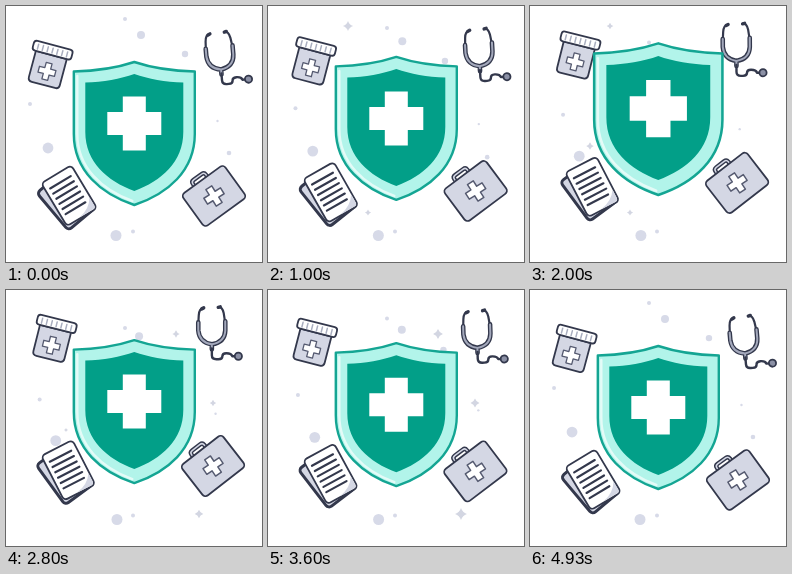
An HTML page that plays this animation: 256 by 256 pixels, repeating every 4990 ms.

```html
<!DOCTYPE html>
<html lang="en">
<head>
<meta charset="utf-8">
<title>Medical shield</title>
<style>
html, body { margin: 0; width: 100%; height: 100%; overflow: hidden; background: #fff; }
svg { display: block; width: 100vw; height: 100vh; }
.ink { stroke: #33384c; stroke-width: 1.8; stroke-linejoin: round; stroke-linecap: round; }
.grey { fill: #d4d7e4; }
.white { fill: #fff; }
.none { fill: none; }
</style>
</head>
<body>
<svg viewBox="0 0 256 256" xmlns="http://www.w3.org/2000/svg">
  <defs>
    <path id="plus" d="M-3 -8.500H3V-3H8.500V3H3V8.500H-3V3H-8.500V-3H-3Z"/>
    <path id="spark" d="M0 -1Q.25 -.25 1 0Q.25 .25 0 1Q-.25 .25 -1 0Q-.25 -.25 0 -1Z"/>
  </defs>

  <g id="dots" fill="#d7dae8"></g>
  <g id="sparks" fill="#d3d6e2"></g>

  <g id="bottle" class="ink">
    <path class="grey" d="M-16 -13H16V14Q16 18 12 18H-12Q-16 18 -16 14Z"/>
    <rect class="white" x="-20" y="-23" width="40" height="10" rx="3"/>
    <path stroke="#a9aebf" stroke-width="1.5" d="M-15 -20V-15M-10 -20V-15M-5 -20V-15M0 -20V-15M5 -20V-15M10 -20V-15M15 -20V-15"/>
    <use href="#plus" class="white" transform="translate(0 4)" stroke-width="1.3" stroke="#555a70"/>
  </g>

  <g id="scope" class="ink none">
    <path stroke-width="2.200" d="M197 18Q193 18 192.500 25L192 34M219 33L217.500 23Q216 16 212 17"/>
    <path id="tube" stroke-width="4.600" d="M192 32V40Q193 52 205.500 54Q218.500 52 219 40V31M205.500 54V59"/>
    <path stroke="#a3a8bb" stroke-width="2" d="M192 32V40Q193 52 205.500 54Q218.500 52 219 40V31M205.500 54V59"/>
    <path stroke-width="2.400" d="M205.500 58V65Q205.500 69 210 69H212Q216 69 216 66Q216 63 220 63Q225 63 226 66H229"/>
    <path stroke-width="3.400" d="M195.500 18.500L197.500 17.500M214 16.500L212 17"/>
    <circle cx="232" cy="66" r="3.600" fill="#8b90a5"/>
  </g>

  <g id="papers" class="ink">
    <rect class="grey" x="-17" y="-25" width="34" height="49" rx="4" transform="translate(-3 3) rotate(-9)" stroke-width="3"/>
    <rect class="white" x="-17" y="-25" width="35" height="50" rx="4" transform="translate(2 0)"/>
    <path fill="#d4d7e4" stroke="none" d="M19 12V21Q19 24 16 24H0Q13 22 19 12Z"/>
    <path stroke-width="2.200" d="M-10 -16H14M-10 -10H14M-10 -4H14M-10 2H14M-10 8H14M-10 14H13"/>
  </g>

  <g id="kit" class="ink">
    <path class="none" stroke-width="4.400" d="M-10 -20V-22Q-10 -25 -7 -25H3Q6 -25 6 -22V-20"/>
    <path class="none" stroke="#d4d7e4" stroke-width="1.500" d="M-10 -20V-22Q-10 -25 -7 -25H3Q6 -25 6 -22V-20"/>
    <rect class="grey" x="-26" y="-20" width="52" height="40" rx="4"/>
    <use href="#plus" class="white" transform="rotate(4) scale(1.150)" stroke-width="1.300" stroke="#555a70"/>
  </g>

  <g id="shield">
    <path fill="#b2f4ea" stroke="#14a593" stroke-width="2.400" stroke-linejoin="round"
      d="M0 -72C-18 -66 -39 -63 -60.500 -62.500V0C-60.500 37 -33 60 0 71C33 60 60.500 37 60.500 0V-62.500C39 -63 18 -66 0 -72Z"/>
    <path fill="none" stroke="#fff" stroke-width="2.400" stroke-linecap="round" opacity=".65"
      d="M-57 -58V0C-57 34 -32 56 -2 67"/>
    <path fill="#029f88"
      d="M0 -60C-14 -55 -31 -52 -49 -51.500V-2C-49 28 -27 47 0 57C27 47 49 28 49 -2V-51.500C31 -52 14 -55 0 -60Z"/>
    <path id="cross" fill="#fff"
      d="M-11.500 -27H11.500V-11.500H27V11.500H11.500V27H-11.500V11.500H-27V-11.500H-11.500Z"/>
  </g>
</svg>
<script>
const LOOP = 4990;
const NS = "http://www.w3.org/2000/svg";
const el = id => document.getElementById(id);

// x, y, radius, drift x, drift y
const dots = [
  [119, 13, 2, 0, 26], [135, 29, 4, -2, 18], [179, 48, 3.2, -6, 20], [24, 98, 2, 10, 12],
  [42, 142, 5.4, 8, 9], [110, 229.5, 5.5, 1, 0], [127, 225.5, 2, 0, 0],
  [223, 147, 2.3, -11, 12], [211.500, 115, 1.2, -2, 9]
];
// x, y, size, start and end in seconds
const sparks = [
  [80, 20, 5.5, .1, 2.5], [170, 44, 5, 2.1, 4.8], [193, 224, 6, 2.1, 4.85],
  [60, 140, 3.8, 1, 3.2], [100, 206.5, 4, .4, 2.6], [207, 113, 4.5, 2.1, 4.85]
];

function addAll(list, parent, tag) {
  return list.map(() => el(parent).appendChild(document.createElementNS(NS, tag)));
}
const dotEls = addAll(dots, "dots", "circle");
const sparkEls = addAll(sparks, "sparks", "use");
sparkEls.forEach(s => s.setAttribute("href", "#spark"));

function place(node, x, y, angle = 0, scale = 1) {
  node.setAttribute("transform", `translate(${x} ${y}) rotate(${angle}) scale(${scale})`);
}

function hump(t, a, b) {
  return t <= a || t >= b ? 0 : Math.sin(Math.PI * (t - a) / (b - a));
}

// Cosine-eased track through [time, value] points.
function track(t, points) {
  for (let i = 1; i < points.length; i++) {
    const [t0, v0] = points[i - 1], [t1, v1] = points[i];
    if (t <= t1) return v0 + (v1 - v0) * (1 - Math.cos(Math.PI * (t - t0) / (t1 - t0))) / 2;
  }
  return 0;
}

function draw(t) {
  const f = (1 - Math.cos(2 * Math.PI * t / 5)) / 2;
  const pulse = hump(t, 1.3, 2.7) ** 2;
  const lift = track(t, [[0, 0], [1.7, 8], [4.9, 0]]) + 6.5 * pulse;

  place(el("shield"), 128.3, 128 - lift, 0, 1 + .06 * pulse);
  place(el("cross"), 0, -10.5);

  place(el("bottle"), 42 + 4.5 * f, 61.5 - 10.5 * f, 15 - f);
  el("scope").setAttribute("transform",
    `translate(${8.5 * (1 - f)} ${9 * (1 - f)}) rotate(${-5 * (1 - f)} 212 42)`);
  place(el("papers"), 61 - f, 191 - 10 * f, -31 + 4 * f);
  place(el("kit"), 208 - f, 190 - 14.5 * f, -36 - 2 * f);

  dots.forEach(([x, y, r, dx, dy], i) => {
    const c = dotEls[i];
    c.setAttribute("cx", x + dx * f);
    c.setAttribute("cy", y + dy * f);
    c.setAttribute("r", r);
  });
  sparks.forEach(([x, y, size, a, b], i) => place(sparkEls[i], x, y, 0, size * hump(t, a, b)));
}

// Poses advance in tenths of a second, held alternately 130 and 70 ms.
function frame(now) {
  const ms = now % LOOP;
  const step = 2 * Math.floor(ms / 200) + (ms % 200 >= 130 ? 1 : 0);
  draw(step / 10);
}
const start = performance.now();
function tick(now) {
  frame(Math.max(0, now - start));
  requestAnimationFrame(tick);
}
draw(0);
requestAnimationFrame(tick);
</script>
</body>
</html>
```
